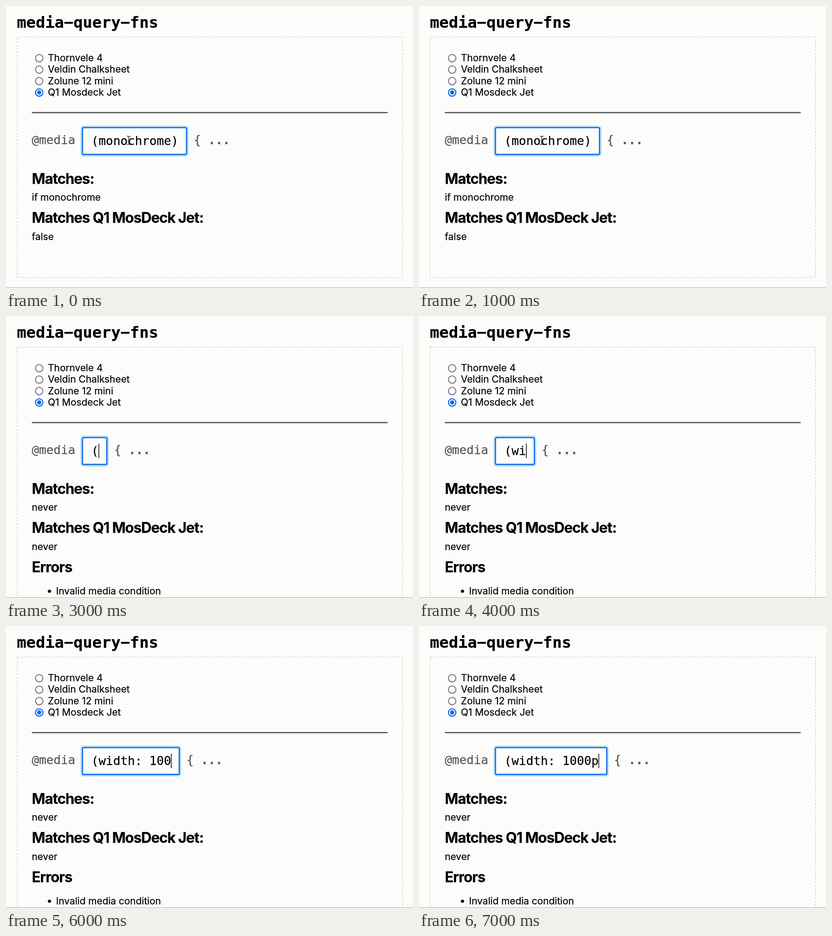
Write an HTML page that moves like this. It is 899 px wide and 623 px high and loops after 8 s.

```html
<!DOCTYPE html>
<html lang="en">
<head>
<meta charset="utf-8">
<title>media-query-fns</title>
<style>
  html, body { margin: 0; width: 100%; height: 100%; overflow: hidden; background: #fcfdfb; }
  svg { display: block; width: 899px; height: 623px; }
  text { font: 21.33px Inter, sans-serif; font-optical-sizing: none; white-space: pre; stroke: #000; stroke-width: 0.25; }
  .title { font: bold 34.6px "DejaVu Sans Mono", monospace; }
  .code { font: 26.6px "DejaVu Sans Mono", monospace; }
  .heading { font-size: 32px; font-weight: 700; letter-spacing: -0.034em; }
  .dim { fill: #555; stroke: #555; }
  .dots { font-weight: bold; }
  .radio { fill: #fefefe; stroke: #85818d; stroke-width: 2.4; }
  .radio.on { stroke: #0b68e8; }
  .dashed { fill: none; stroke: #c6cab8; stroke-width: 1.3; stroke-dasharray: 4 3.2; }
</style>
</head>
<body>
<svg viewBox="0 0 899 623">
  <text class="title" x="24" y="48.3">media−query−fns</text>
  <rect id="panel" class="dashed" x="24.7" y="68.6" width="851" height="531"/>
  <g id="devices"></g>
  <path d="M57 235.5H843" stroke="#4c4c47" stroke-width="2.6"/>

  <text class="code dim" x="57" y="304.5">@media</text>
  <rect id="glow" x="166.3" y="266" height="64.6" rx="5" fill="none" stroke="#b5dcf8" stroke-width="3.6"/>
  <rect id="field" x="169" y="268.7" height="59.2" rx="2.5" fill="#fdfdfc" stroke="#0b68e8" stroke-width="2.6"/>
  <rect id="selection" x="204.5" y="282" width="176" height="32" fill="#a8d0f8"/>
  <text id="query" class="code" x="188.6" y="306.7"></text>
  <rect id="caret" y="282" width="1.5" height="32"/>
  <path id="pointer" d="M267 287.5q4 0 4 3q0 -3 4 -3M271 290V304M267 306.5q4 0 4 -3q0 3 4 3M269 299.5h4"
        fill="none" stroke="#222" stroke-width="1.3"/>
  <text id="brace" class="code dim" y="304.5">{ <tspan class="dots">...</tspan></text>

  <text class="heading" x="57" y="393">Matches:</text>
  <text id="matches" x="57" y="430"></text>
  <text class="heading" x="57" y="479">Matches Q1 MosDeck Jet:</text>
  <text id="result" x="57" y="516.5"></text>
  <g id="errors">
    <text class="heading" x="57" y="565.5">Errors</text>
    <circle cx="96" cy="608" r="3.6"/>
    <text x="110.5" y="614.5">Invalid media condition</text>
  </g>
  <path d="M0 622.5H899" stroke="#a3a57c"/>
</svg>
<script>
const $ = id => document.getElementById(id);
const CHAR = 16, STEP = 1000;
const steps = [
  { query: "(monochrome)", valid: true, pointer: true },
  { query: "(monochrome)", valid: true, pointer: true },
  { query: "(monochrome)", valid: true, selection: true },
  { query: "(", caret: true },
  { query: "(wi", caret: true },
  { query: "(width: " },
  { query: "(width: 100", caret: true },
  { query: "(width: 1000p", caret: true },
];

const devices = ["Thornvele 4", "Veldin Chalksheet", "Zolune 12 mini", "Q1 Mosdeck Jet"];
$("devices").innerHTML = devices.map((name, i) => {
  const y = 115.3 + i * 25.25, on = i === 3;
  return `<circle class="radio ${on ? "on" : ""}" cx="73.3" cy="${y}" r="8.2"/>` +
    (on ? `<circle cx="73.3" cy="${y}" r="4.7" fill="#0b68e8"/>` : "") +
    `<text x="92.5" y="${y + 6.9}">${name}</text>`;
}).join("");

const show = (id, on) => $(id).style.display = on ? "" : "none";

function render({ query, valid, pointer, selection, caret }) {
  const typed = query.length * CHAR;
  $("query").textContent = query;
  $("field").setAttribute("width", typed + 37.7);
  $("glow").setAttribute("width", typed + 43.1);
  $("brace").setAttribute("x", typed + 222.8);
  $("caret").setAttribute("x", typed + 188.4);
  $("panel").setAttribute("height", valid ? 531 : 620);
  $("matches").textContent = valid ? "if monochrome" : "never";
  $("result").textContent = valid ? "false" : "never";
  show("pointer", pointer);
  show("selection", selection);
  show("caret", caret);
  show("errors", !valid);
}

let current;
function tick() {
  const step = steps[Math.floor(performance.now() / STEP) % steps.length];
  if (step !== current) render(current = step);
  requestAnimationFrame(tick);
}
tick();
</script>
</body>
</html>
```
